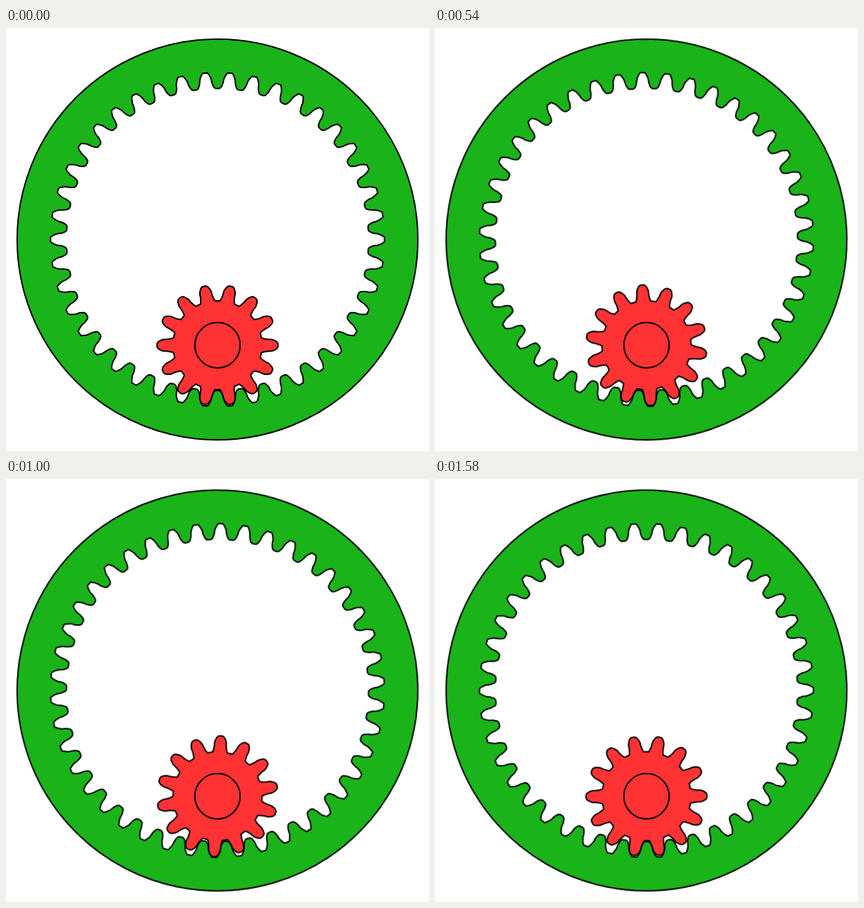
Recreate the animation shown at these times as an HTML page. Size 600x600 px, loop 1600 ms.

```html
<!DOCTYPE html>
<html lang="en">
<head>
<meta charset="utf-8">
<title>Ring gear and pinion</title>
<style>
html, body { margin: 0; width: 100%; height: 100%; overflow: hidden; background: #fff; }
svg { display: block; width: 100vw; height: 100vh; }
path, circle { stroke: #000; stroke-width: 2; stroke-linejoin: round; }
#ring path { fill: #1ab31a; fill-rule: evenodd; }
#pinion { fill: #f33; }
</style>
</head>
<body>
<svg viewBox="0 0 600 600">
  <g transform="translate(300 300)"><g id="ring"><path/></g></g>
  <g transform="translate(300 450)">
    <g id="pinion"><path/></g>
    <circle r="32.14" fill="#f33"/>
  </g>
</svg>
<script>
const LOOP = 1600, STEPS = 80;
const MODULE = 150 / 14;
const ROLL_OUT = 20, ROLL_IN = 16; // rolling circles of the cycloid flanks

// Half the angular width of a tooth at height h above the pitch circle.
function halfAngle(n, h) {
  const r = n * MODULE / 2;
  const roll = h < 0 ? ROLL_IN : ROLL_OUT;
  const q = h < 0 ? -roll : roll;
  const c = r + q, d = r + h;
  const cos = Math.max(-1, Math.min(1, (c * c + q * q - d * d) / (2 * c * q)));
  const theta = Math.acos(cos);
  const shift = roll * theta / r - Math.atan2(roll * Math.sin(theta), c - q * cos);
  return Math.PI / (2 * n) - Math.sign(h) * shift;
}

// One flank from bottom to top as [half angle, radius]; the free tip is rounded off.
function flank(n, low, high, tip) {
  const r = n * MODULE / 2, points = [];
  const count = 16;
  for (let i = 0; i <= count; i++) {
    const h = low + (high - low) * i / count;
    const gap = tip > 0 ? high - h : h - low;
    const cut = 1.3 * Math.max(0, 1 - gap / 1.4) ** 2;
    points.push([halfAngle(n, h) - tip * cut / (r + h), r + h]);
  }
  return points;
}

function gearPath(n, low, high, tip) {
  const side = flank(n, low * MODULE, high * MODULE, tip);
  const outline = [
    ...side.map(([a, r]) => [-a, r]),
    [0, side[side.length - 1][1]],
    ...side.slice().reverse()
  ];
  const points = [];
  for (let k = 0; k < n; k++) {
    const mid = (k + 0.5) * 2 * Math.PI / n;
    for (const [a, r] of outline) {
      points.push((r * Math.sin(mid + a)).toFixed(2) + ' ' + (-r * Math.cos(mid + a)).toFixed(2));
    }
  }
  return 'M' + points.join('L') + 'Z';
}

function circlePath(r) {
  return `M${r} 0A${r} ${r} 0 1 1 ${-r} 0A${r} ${r} 0 1 1 ${r} 0Z`;
}

function spin(id, n, d) {
  const gear = document.getElementById(id);
  gear.firstElementChild.setAttribute('d', d);
  gear.animate(
    { transform: ['rotate(0deg)', `rotate(${360 / n}deg)`] },
    { duration: LOOP, iterations: Infinity, easing: `steps(${STEPS}, end)` }
  );
}

spin('ring', 42, circlePath(284.2) + gearPath(42, -1, 1.1, -1));
spin('pinion', 14, gearPath(14, -1.1, 1, 1));
</script>
</body>
</html>
```
